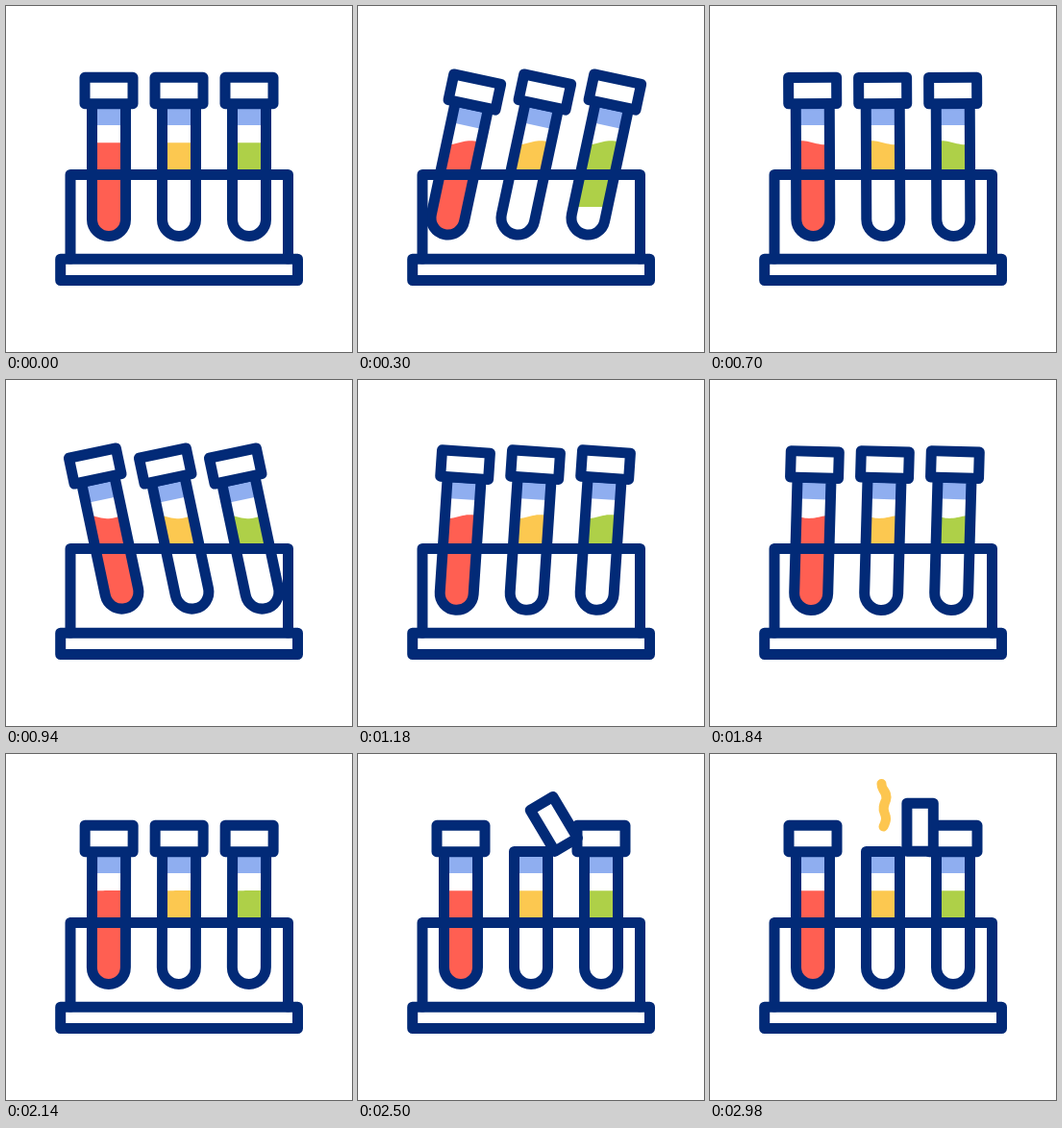
These frames come from a looping animation (360 by 360 pixels, 3 s). An HTML page:

```html
<!DOCTYPE html>
<html lang="en">
<head>
<meta charset="utf-8">
<title>Test tubes</title>
<style>
  html, body { margin: 0; width: 100%; height: 100%; overflow: hidden; background: #fff; }
  svg { display: block; width: 100vw; height: 100vh; }
  .line { fill: none; stroke: #022a77; stroke-width: 11; stroke-linejoin: round; stroke-linecap: round; }
  .lid { fill: #fff; }
</style>
</head>
<body>
<svg viewBox="0 0 360 360">
  <defs>
    <clipPath id="glass"><path d="M-14 101V222A14 14 0 0 0 14 222V101Z"/></clipPath>
  </defs>
  <g id="tubes"></g>
  <path class="line" stroke-width="10.5" d="M67 263V175.5H293.5V263"/>
  <rect class="line" x="56.7" y="263.2" width="246.8" height="22.4"/>
  <path id="smoke" fill="none" stroke="#fdc650" stroke-width="10" stroke-linecap="round" stroke-linejoin="round"
    pathLength="1" d="M180.5 75.5C184 68 183.5 66 181.5 61C179.5 56 181 53 183 48C184.5 43 182.5 40 180 36.500Q178.500 34 178.500 31"/>
</svg>
<script>
const LOOP = 3000;
const PIVOT_Y = 157;
const SURFACE = 143;
const FLOOR = 176;

// [time in ms, tilt in degrees]
const swing = [[0, 0], [380, 13.4], [1000, -12.5], [1240, 6.5], [1620, -6], [1900, 2.5], [2180, 0], [3000, 0]];
const lidTurn = [[0, 0], [2200, 0], [2700, 90], [3000, 90]];
const smokeDraw = [[0, 0], [2600, 0], [2880, 1], [3000, 1]];

const tubesLayer = document.getElementById('tubes');
const smoke = document.getElementById('smoke');

function make(tag, attrs, parent) {
  const el = document.createElementNS('http://www.w3.org/2000/svg', tag);
  for (const key in attrs) el.setAttribute(key, attrs[key]);
  parent.appendChild(el);
  return el;
}

function ease(keys, t) {
  const i = Math.max(1, keys.findIndex(key => key[0] > t));
  const [t0, a] = keys[i - 1], [t1, b] = keys[i];
  return a + (b - a) * (1 - Math.cos(Math.PI * (t - t0) / (t1 - t0))) / 2;
}

function addTube(x, color, floor) {
  const place = make('g', { transform: `translate(${x} 0)` }, tubesLayer);
  const body = make('g', {}, place);
  const inside = make('g', { 'clip-path': 'url(#glass)' }, body);
  make('rect', { x: -14, y: 101, width: 28, height: 23, fill: '#8faef0' }, inside);
  const liquid = make('path', { fill: color }, inside);
  make('path', { class: 'line', d: 'M-17.5 101.500H17.500V222A17.500 17.500 0 0 1 -17.500 222Z' }, body);
  const lid = make('rect', { class: 'line lid', x: -25, y: 74.3, width: 50, height: 27.4 }, body);
  return { body, liquid, lid, floor };
}

const tubes = [
  addTube(107, '#ff5f52', () => 250),
  addTube(180, '#fcc850', () => FLOOR),
  addTube(253, '#aed048', tilt => FLOOR + 33 * Math.min(1, Math.max(0, (tilt - 6) / 4)))
];
const openTube = tubes[1];
tubesLayer.appendChild(openTube.body.parentNode);

function liquidPath(t, floor) {
  const height = 2 * Math.min(1, t / 200, Math.max(0, (2180 - t) / 400));
  const phase = 2 * Math.PI * (t - 700) / 860;
  let d = `M-40 ${floor}`;
  for (let x = -40; x <= 40; x += 2) {
    d += `L${x} ${SURFACE - 0.8 + height * Math.sin(x * Math.PI / 24 + phase)}`;
  }
  return d + `L40 ${floor}Z`;
}

function draw(t) {
  const tilt = ease(swing, t);
  for (const { body, liquid, floor } of tubes) {
    body.setAttribute('transform', `rotate(${tilt} 0 ${PIVOT_Y})`);
    liquid.setAttribute('transform', `rotate(${-tilt} 0 ${PIVOT_Y})`);
    liquid.setAttribute('d', liquidPath(t, floor(tilt)));
  }
  openTube.lid.setAttribute('transform', `rotate(${ease(lidTurn, t)} 25.2 101.4)`);

  const drawn = ease(smokeDraw, t);
  smoke.style.visibility = drawn > 0 ? 'visible' : 'hidden';
  smoke.setAttribute('stroke-dasharray', drawn < 1 ? `${drawn} 2` : 'none');
}

const start = performance.now();
function tick() {
  draw((performance.now() - start) % LOOP);
  requestAnimationFrame(tick);
}
draw(0);
requestAnimationFrame(tick);
</script>
</body>
</html>
```
